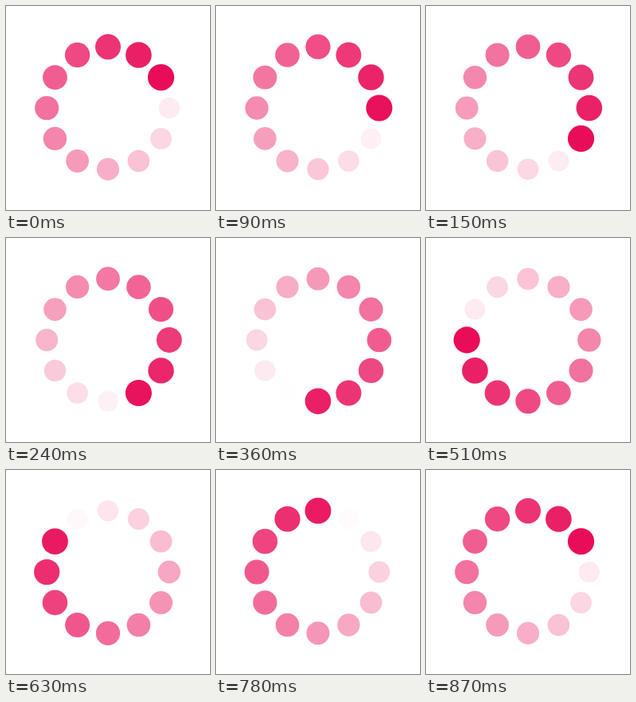
Write an HTML page that moves like this. It is 256x256 px and loops after 900 ms.

```html
<!DOCTYPE html>
<html lang="en">
<head>
<meta charset="utf-8">
<title>Dot spinner</title>
<style>
  html, body { margin: 0; height: 100%; overflow: hidden; background: #fff; }
  svg { display: block; width: 100vw; height: 100vh; }
</style>
</head>
<body>
<svg viewBox="0 0 256 256" fill="#e90c59"></svg>
<script>
  const DOTS = 12, STEP_MS = 30, STEPS = 30;
  const TURN = STEPS - 1; // the last step repeats the first pose
  const CENTER = 128, ORBIT = 76.8, RADIUS = 12.8, GROWTH = 0.3;
  const svg = document.querySelector('svg');

  const dots = Array.from({ length: DOTS }, (_, i) => {
    const angle = (i - 1) * 2 * Math.PI / DOTS;
    const dot = document.createElementNS(svg.namespaceURI, 'circle');
    dot.setAttribute('cx', CENTER + ORBIT * Math.cos(angle));
    dot.setAttribute('cy', CENTER + ORBIT * Math.sin(angle));
    return svg.appendChild(dot);
  });

  function draw(time) {
    const step = Math.floor(time / STEP_MS) % STEPS;
    const cycle = DOTS * TURN;
    dots.forEach((dot, i) => {
      // Each dot lights up in turn, then fades and shrinks linearly.
      const age = (DOTS * step - TURN * i + cycle) % cycle;
      const strength = 1 - age / cycle;
      dot.setAttribute('r', RADIUS * (1 + GROWTH * strength));
      dot.setAttribute('fill-opacity', strength);
    });
  }

  function tick() {
    draw(performance.now());
    requestAnimationFrame(tick);
  }
  tick();
</script>
</body>
</html>
```
